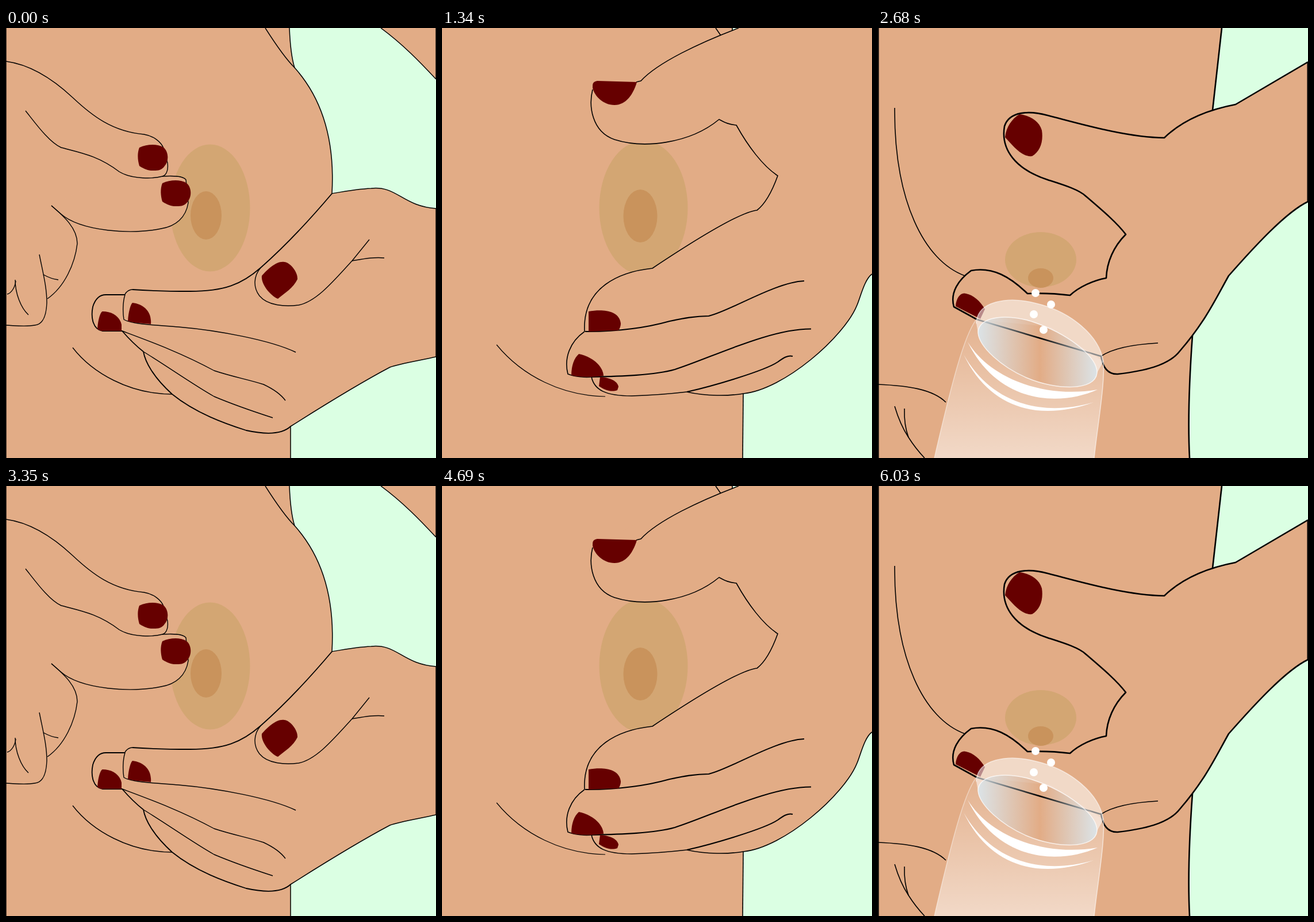
An HTML page for the animation above (6700 ms loop, 748x748 px).

```html
<!DOCTYPE html>
<html lang="en">
<head>
<meta charset="utf-8">
<title>Hand expression steps</title>
<style>
  html, body { margin: 0; width: 100%; height: 100%; overflow: hidden; background: #e2ac86; }
  svg { display: block; width: 100vw; height: 100vh; }
</style>
</head>
<body>
<svg id="stage" viewBox="0 0 748 748"></svg>
<script>
const STEP = 670;
const SKIN = '#e2ac86', MINT = '#dbffe3', NAIL = '#660000', TAN = '#d3a673', BROWN = '#c9935c';
const stage = document.getElementById('stage');

const shape = (d, fill) => `<path d="${d}" fill="${fill}"/>`;
const line = (d, w = 1.4) => `<path d="${d}" fill="none" stroke="#000" stroke-width="${w}" stroke-linejoin="round"/>`;
const oval = (x, y, rx, ry, fill) => `<ellipse cx="${x}" cy="${y}" rx="${rx}" ry="${ry}" fill="${fill}"/>`;
const nails = (...list) => list.map(d => shape(d, NAIL)).join('');
const lines = (w, ...list) => list.map(d => line(d, w)).join('');
const ground = shape('M0 0H748V748H0Z', SKIN);

// Two hands: the left one can be shifted
function massage(dx, dy) {
  const upper = 'M0 58C45 64 85 92 116 121C150 153 185 180 240 185C258 188 270 199 274 209L281 235C283 250 277 257 272 258C258 262 220 264 197 250C160 222 130 217 96 208C75 199 50 164 34 144';
  const lower = 'M272 258C290 257 308 257 313 264L317 304C313 330 295 345 270 349C220 360 130 354 95 323L79 309';
  const tip = 'M232 208C245 202 262 201 273 207C283 214 284 231 276 240C270 249 262 248 252 248C243 247 237 243 232 240C229 230 228 218 232 208Z';
  const leftHand = `<g transform="translate(${dx} ${dy})">` +
    shape(upper + 'L0 144Z', SKIN) + shape(lower + 'L197 250Z', SKIN) +
    lines(1.4, upper, lower,
      'M79 309C100 327 124 348 124 375C120 410 102 450 72 471',
      'M58 394C64 425 71 450 71 478C70 505 62 516 50 517C35 520 20 518 0 517',
      'M65 429C74 434 82 437 91 438',
      'M16 438C16 462 26 487 39 499',
      'M17 440C16 450 10 461 2 463') +
    nails(tip) + `<g transform="translate(40 62)">${nails(tip)}</g></g>`;

  return ground +
    shape('M493 0C494 25 496 50 502 69C545 117 573 185 567 288C590 284 612 280 635 279C680 274 690 310 748 314V89C720 59 690 28 652 0Z', MINT) +
    shape('M495 748V693C555 655 615 618 668 590C680 585 715 579 748 572V748Z', MINT) +
    oval(355, 313, 69.5, 110.5, TAN) + oval(348, 326, 27, 42, BROWN) +
    lines(1.5,
      'M493 0C494 25 496 50 502 69C545 117 573 185 567 288C590 284 612 280 635 279C680 274 690 310 748 314',
      'M451 0C465 22 483 50 502 69',
      'M652 0C690 28 720 59 748 89',
      'M495 748V693C555 655 615 618 668 590C680 585 715 579 748 572') +
    leftHand +
    lines(1.8,
      'M567 288C523 340 485 380 443 417C410 446 380 458 320 458C290 458 250 457 220 455',
      'M207 464H174C160 464 154 475 151 485C147 505 152 525 168 527H202',
      'M202 527C215 542 225 552 239 563',
      'M239 563C242 580 255 606 289 637C330 670 380 688 418 700C450 707 480 707 495 693') +
    lines(1.4,
      'M220 455C212 455 207 462 207 464C203 477 203 495 205 507C220 516 265 517 300 520C370 526 460 543 504 564',
      'M443 417C430 432 430 452 441 466C455 483 485 485 509 482C540 476 570 440 602 405L632 368',
      'M602 405C620 402 640 398 658 400',
      'M202 527C250 545 305 565 362 596C395 607 420 611 448 620C465 628 478 637 486 648',
      'M239 563C280 588 325 620 362 641C395 655 430 667 464 678',
      'M116 556C150 600 215 637 289 637',
      'M0 0V748M748 0V89M748 314V572') +
    nails('M445 431C455 420 470 405 484 407C495 408 508 425 507 437C500 452 485 461 473 471C460 466 443 445 445 431Z',
      'M159 524C160 505 165 493 168 493C185 493 198 502 201 516V527H166Z',
      'M212 510C213 493 217 480 220 478C238 480 254 492 252 515C240 514 225 513 212 510Z');
}

function hold() {
  const inner = 'M262 107C255 135 260 180 300 194C350 210 430 202 482 159C493 165 500 168 512 169C532 205 558 240 584 257C575 282 562 306 548 317C520 320 450 362 366 418C310 424 244 450 248 528';
  const edge = 'C735 437 728 468 722 482C700 537 595 629 524 636';
  return ground +
    shape(`M748 428${edge}L523 748H748Z`, MINT) + shape('M505 0H516L505 5Z', MINT) +
    oval(350.5, 313, 77, 117, TAN) + oval(345, 327, 29.5, 46, BROWN) +
    shape(inner + 'H640V60H346L262 107Z', SKIN) +
    lines(1.6, inner, `M748 428${edge}C500 640 460 641 426 633`,
      'M524 636L523 748', 'M516 0C450 25 375 60 346 92L338 94', 'M476 0L485 13M505 0V4',
      'M248 528C222 546 212 575 219 602C232 607 250 608 260 607',
      'M260 607C265 630 285 640 330 640C365 639 400 636 426 633') +
    lines(2.1,
      'M249 528C300 528 350 523 396 510C420 505 440 501 464 501C500 493 580 442 630 440',
      'M260 607C310 606 370 604 405 594C470 573 570 523 642 523.5',
      'M426 633C470 623 560 597 584 581C595 573 602 569 610 571') +
    line('M95 551C140 606 210 640 284 641', 1.2) +
    nails('M262 100Q262 93 270 92L339 94C333 115 320 134 300 134C280 134 265 118 262 104Z',
      'M255 493C280 489 308 491 311 514Q311 520 307 526L255 528Z',
      'M238 567C260 571 280 587 281 605C262 608 240 608 225 604C225 587 230 574 238 567Z',
      'M275 607C290 608 305 613 307 624L305 630C295 634 283 630 273 623Z');
}

function press() {
  return ground +
    shape('M509 0C510 25 512 55 517 74L531 93C560 58 590 26 615 0Z', MINT) +
    shape('M488 748V602Q495 598 502 592C545 592 590 592 616 580C635 575 690 475 748 370V748Z', MINT) +
    oval(396, 345, 77, 81, TAN) + oval(390, 355, 29, 30.5, BROWN) +
    lines(1.2, 'M509 0C510 25 512 55 517 74L531 93', 'M473 0C490 28 508 58 530 79',
      'M488 748V602Q495 598 502 592', 'M201 314C245 324 290 352 325 394',
      'M159 545C190 588 250 624 324 622') +
    nails('M272 175C290 174 312 175 318 181C326 190 327 230 320 244Q317 250 309 250C292 250 276 246 262 241C254 220 256 195 272 175Z',
      'M225 396L267 432C270 440 270 449 266 457L210 415Q213 402 225 396Z') +
    lines(2.5,
      'M615 0C580 35 545 73 514 116C450 131 390 142 333 151C300 155 276 167 265 186C252 210 258 235 270 263',
      'M217 214C228 232 248 255 275 264C315 274 360 270 405 259C440 253 475 260 497 271C510 269 525 271 541 275',
      'M497 271C520 298 545 318 570 335Q585 343 604 350',
      'M497 271C506 295 515 327 535 361C543 374 552 382 565 386',
      'M535 361C528 378 522 395 520 412C495 420 465 434 440 444L351 416C315 387 280 355 249 351C225 358 203 385 208 414C240 440 270 458 300 482L340 517L427 590C500 592 570 593 616 580C635 575 690 475 748 370',
      'M340 517C375 549 460 559 495 558C530 555 560 549 592 543');
}

function collect() {
  const hand = 'M748 59L622 133C575 142 530 160 498 191C430 190 350 166 295 152C262 143 228 145 220 171C213 212 240 246 295 264C320 272 350 281 362 293C390 317 415 338 431 359C410 380 398 407 397 435C375 439 350 450 334 465C310 462 285 461 260 462C230 433 200 415 162 422C140 438 125 460 132 485L172 507L388 571Q393 603 417 602C460 597 505 588 525 562C570 510 588 470 610 431C655 380 710 320 748 302';
  const mouth = 'M174 530C174 500 230 495 280 515C340 538 382 575 381 600C378 632 310 630 260 609C215 590 176 555 174 530Z';
  const rim = 'M171 514C172 475 225 466 275 479C335 493 385 535 392 580';
  const wall = 'M171 507C150 535 130 610 98 748';
  const side = 'M392 580C395 620 382 690 376 748';
  const glint = (d, a) => `<path d="${d}" fill="none" stroke="#fff" stroke-opacity="${a}" stroke-width="1.5"/>`;
  const drops = [[274, 461], [301, 481], [271, 498], [288, 525]];
  return `<defs>
    <linearGradient id="body" gradientUnits="userSpaceOnUse" x1="0" y1="520" x2="0" y2="748">
      <stop stop-color="#fff" stop-opacity=".1"/><stop offset="1" stop-color="#fff" stop-opacity=".54"/>
    </linearGradient>
    <linearGradient id="mouth">
      <stop stop-color="#dbe6ec" stop-opacity=".95"/><stop offset=".52" stop-color="#dbe6ec" stop-opacity="0"/>
      <stop offset="1" stop-color="#dbe6ec" stop-opacity=".95"/>
    </linearGradient></defs>` + ground +
    shape('M598 0L582 143L622 133L748 59V0Z', MINT) +
    shape('M748 302C710 320 655 380 610 431C588 470 570 502 547 535C543 590 538 670 542 748H748Z', MINT) +
    oval(283, 403, 62, 48, TAN) + oval(283, 435, 22, 17, BROWN) +
    nails('M246 150C262 152 280 160 285 178C288 198 282 215 268 223C250 225 235 205 221 190C223 172 233 158 246 150Z',
      'M135 484C136 468 145 459 153 462C165 464 178 475 186 489L178 506Z') +
    lines(2.6, hand, 'M598 0L582 143', 'M547 535C543 590 538 670 542 748') +
    lines(1.6, 'M388 571C410 556 450 550 487 548', 'M29 139C28 300 80 405 151 431',
      'M0 620C50 622 95 628 118 651', 'M29 658C37 685 45 700 53 712Q65 731 81 748',
      'M46 662Q45 690 53 712') +
    line('M0 0V748M748 59V302', 3) +
    `<path d="${wall}H376C382 690 395 620 392 580L300 520Z${mouth}" fill="url(#body)" fill-rule="evenodd"/>` +
    `<path d="${rim}L381 600C382 575 340 538 280 515C230 495 174 500 174 530Z" fill="#fff" fill-opacity=".54"/>` +
    shape(mouth, 'url(#mouth)') +
    glint(mouth, .75) + glint(rim, .6) + glint(wall, .4) + glint(side, .6) +
    shape('M156 546C195 610 290 645 382 629C312 660 208 652 156 546Z', '#fff') +
    shape('M149 568C192 645 275 680 375 651C290 682 198 670 149 568Z', '#fff') +
    drops.map(([x, y]) => oval(x, y, 7, 7, '#fff')).join('');
}

const poses = [massage(0, 0), massage(-30, -30), hold(), press(), collect()];
stage.innerHTML = poses.map(p => `<g display="none">${p}</g>`).join('');
const groups = [...stage.children];
let shown = -1;

function draw(ms) {
  const now = Math.floor(ms / STEP) % groups.length;
  if (now === shown) return;
  groups.forEach((g, i) => g.setAttribute('display', i === now ? 'inline' : 'none'));
  shown = now;
}

const start = performance.now();
function tick() {
  draw(performance.now() - start);
  requestAnimationFrame(tick);
}
tick();
</script>
</body>
</html>
```
